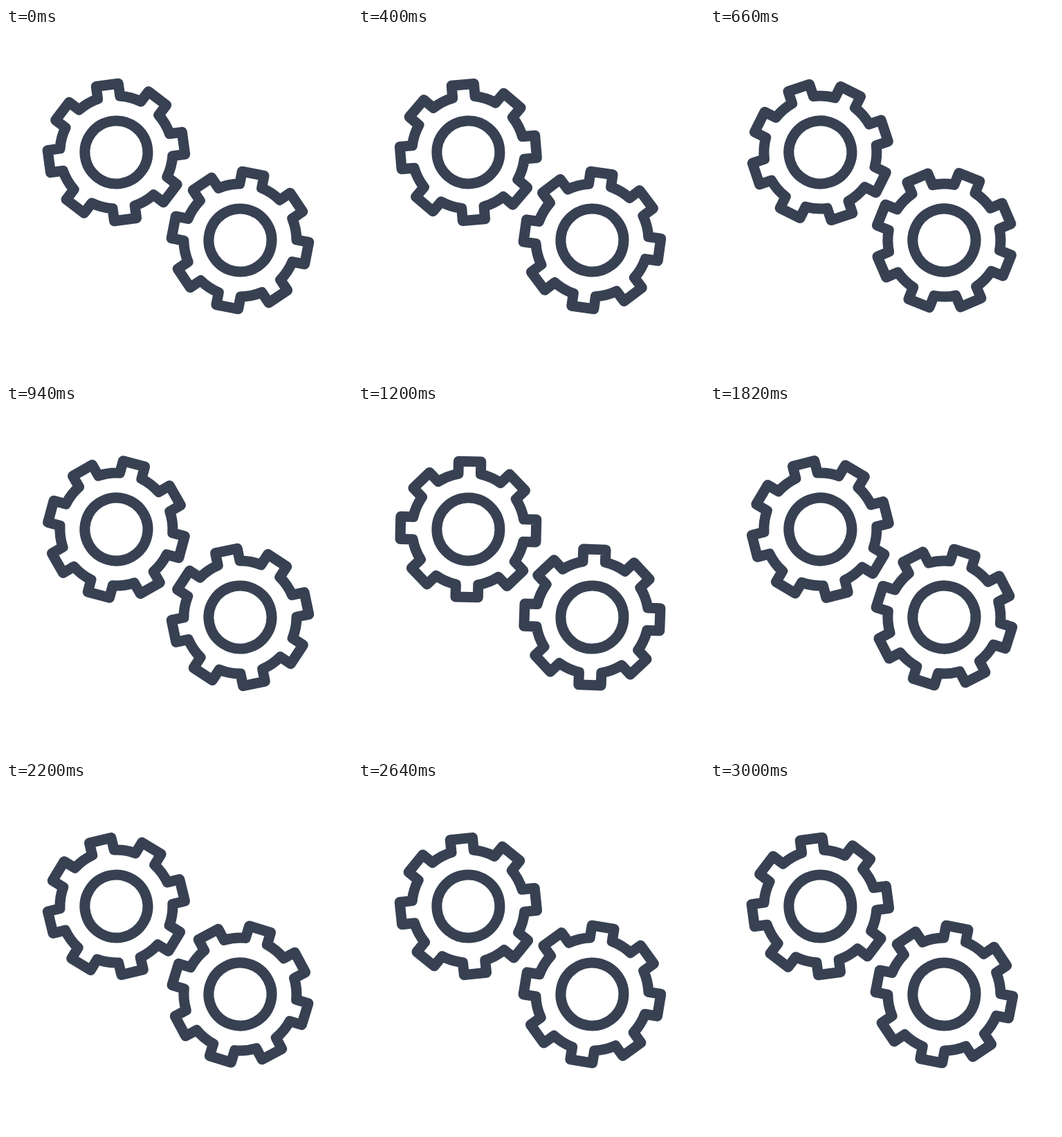
An HTML page with a canvas that plays this animation: 500 px wide and 504 px high, repeating every 3020 ms.

```html
<!DOCTYPE html>
<html lang="en">
<head>
<meta charset="utf-8">
<title>Turning gears</title>
<style>
html, body { margin: 0; width: 100%; height: 100%; overflow: hidden; background: #fff; }
canvas { display: block; }
</style>
</head>
<body>
<canvas id="stage" width="500" height="504"></canvas>
<script>
const ctx = document.getElementById('stage').getContext('2d');
const LOOP = 3020, STEP = 20, TURN = 3000;
const TEETH = 8, HALF = 16.2, TIP = 98, ROOT = 81.5, HUB = 45.5;
const rad = deg => deg * Math.PI / 180;

function gearPath() {
  const path = new Path2D();
  const pitch = 2 * Math.PI / TEETH;
  const rootAngle = Math.asin(HALF / ROOT);
  const tipAngle = Math.atan2(HALF, TIP);
  const tipRadius = Math.hypot(HALF, TIP);
  for (let i = 0; i < TEETH; i++) {
    const a = i * pitch;
    for (const s of [-1, 1]) {
      const t = a + s * tipAngle;
      path.lineTo(tipRadius * Math.cos(t), tipRadius * Math.sin(t));
    }
    path.arc(0, 0, ROOT, a + rootAngle, a + pitch - rootAngle);
  }
  path.closePath();
  path.moveTo(HUB, 0);
  path.arc(0, 0, HUB, 0, 2 * Math.PI);
  return path;
}

const gear = gearPath();

function drawGear(x, y, deg) {
  ctx.save();
  ctx.translate(x, y);
  ctx.rotate(rad(deg));
  ctx.stroke(gear);
  ctx.restore();
}

function draw(now) {
  const t = Math.floor((now % LOOP) / STEP) * STEP;
  const spin = 360 * t / TURN;
  ctx.fillStyle = '#fff';
  ctx.fillRect(0, 0, 500, 504);
  ctx.strokeStyle = '#374152';
  ctx.lineWidth = 15;
  ctx.lineJoin = 'round';
  drawGear(159.4, 179.5, -97.7 + spin);
  drawGear(338.4, 306.5, -79 - spin);
}

const start = performance.now();
function tick() {
  draw(performance.now() - start);
  requestAnimationFrame(tick);
}
tick();
</script>
</body>
</html>
```
